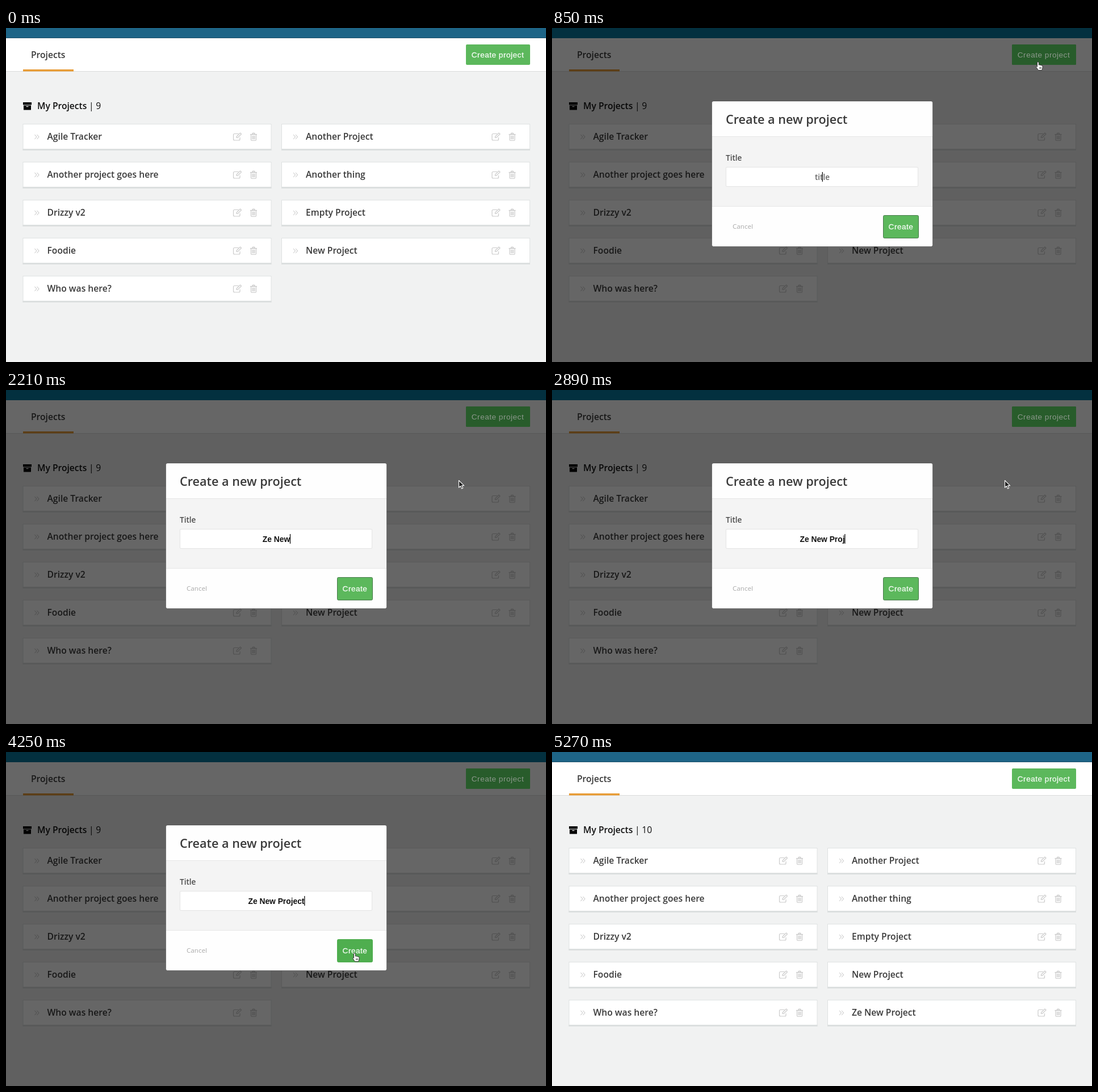
Recreate the animation shown at these times as an HTML page. Size 951 px wide and 589 px high, loop 5.61 s.

```html
<!DOCTYPE html>
<html lang="en">
<head>
<meta charset="utf-8">
<title>Projects</title>
<style>
  html, body { margin: 0; width: 100%; height: 100%; overflow: hidden; background: #f1f2f2; }
  svg { display: block; width: 100%; height: 100%; }
  text { font: 600 15.65px "Open Sans", sans-serif; fill: #3a3a3a; white-space: pre; }
  .plain { font-weight: 400; }
  .small { font-size: 13.6px; }
  .typed { font: 700 13.8px "Liberation Sans", Arial, sans-serif; }
  .btn { font: 400 13.6px "Liberation Sans", Arial, sans-serif; letter-spacing: .5px; }
  .btn { fill: #f4fbf4; stroke: #f4fbf4; stroke-width: .3; text-anchor: middle; }
  .mid { text-anchor: middle; }
</style>
</head>
<body>
<svg viewBox="0 0 951 589">
  <defs>
    <g id="card">
      <rect x=".5" y=".5" width="437" height="46" fill="#fff" stroke="#dfe2e2"/>
      <path d="M0 45.5h438" stroke="#dcdfdf" stroke-width="3"/>
      <path d="M21 19l3.5 4-3.5 4M25 19l3.5 4-3.5 4" fill="none" stroke="#cdcdcd" stroke-width="1.1"/>
      <g fill="none" stroke="#cbcbcb" stroke-width="1.2">
        <path d="M380 17.5h-7a2 2 0 0 0-2 2v7.5a2 2 0 0 0 2 2h7.5a2 2 0 0 0 2-2v-3"/>
        <path d="M376.5 22.5l6.5-6.5 2 2-6.5 6.5h-2z"/>
        <path d="M400.5 18.8h12M404 18.5l1-2h3l1 2" stroke-width="1.4"/>
        <path d="M402 19.5v8.5q0 1.5 1.5 1.5h6q1.5 0 1.5-1.5v-8.5M404.5 21v6.5M406.5 21v6.5M408.5 21v6.5"/>
      </g>
    </g>
  </defs>

  <rect width="951" height="589" fill="#f1f2f2"/>
  <rect width="951" height="18" fill="#1e6587"/>
  <path d="M0 17.5h951" stroke="#1b4f69"/>
  <rect y="18" width="951" height="58" fill="#fff"/>
  <path d="M0 76.5h951" stroke="#dadcdc"/>
  <text x="44" y="53">Projects</text>
  <rect x="30" y="73" width="89" height="3.5" fill="#e89c36"/>
  <rect x="810" y="29" width="113" height="36" rx="2" fill="#5cb85c"/>
  <text class="btn" x="866" y="52">Create project</text>

  <path d="M30 131h15v4.5h-15zM31 136.500h13v8h-13z"/>
  <path d="M35.5 138.5h4" stroke="#f1f2f2" stroke-width="1.3"/>
  <text x="55" y="143" style="fill:#111">My Projects</text>
  <text class="plain" x="146" y="143" style="fill:#111">|<tspan id="count" x="158.3"></tspan></text>
  <g id="cards"></g>

  <g id="dialog">
    <rect width="951" height="589" opacity=".6"/>
    <rect width="951" height="18" fill="#03303f"/>
    <rect x="810" y="29" width="113" height="36" rx="2" fill="#285c2b"/>
    <text class="btn" x="866" y="52" style="fill:#8c988c;stroke:none">Create project</text>

    <rect x="281.5" y="129" width="389" height="256.5" rx="3" fill="#fefefe" stroke="#000" stroke-opacity=".35"/>
    <rect x="282" y="191" width="388" height="124" fill="#f4f4f4"/>
    <path d="M282 191.5h388M282 314.5h388" stroke="#e6e6e6"/>
    <text x="306" y="168.5" style="font-size:21.6px">Create a new project</text>
    <text class="small" x="306" y="233.5" style="fill:#4c4c4c">Title</text>
    <rect x="306.5" y="245.5" width="338" height="34" rx="1.5" fill="#fff" stroke="#e4e4e4"/>
    <text id="hint" class="small mid" x="476" y="267.5" style="fill:#666">title</text>
    <text id="typed" class="typed mid" x="476" y="268" style="fill:#111"></text>
    <rect id="caret" y="254" width="1.3" height="17" fill="#111"/>
    <text class="plain" x="318" y="354" style="font-size:11.65px;fill:#aaa">Cancel</text>
    <rect id="create" x="583.5" y="330.5" width="62" height="40" rx="2"/>
    <text class="btn" x="614.5" y="355">Create</text>
  </g>

  <g id="cursor" stroke-linejoin="round">
    <path id="arrow" d="M0 0v12.5l3-2.7 2 4.6 2.2-1-2-4.3h4z" fill="#222" stroke="#fff" stroke-width="1.1"/>
    <path id="hand" d="M-1.5 1.2q0-1.5 1.4-1.5t1.4 1.5v4q1.5-1 2.4.3 1.5-.8 2.3.5 2-.4 2 1.5v2.5l-1.2 4.5h-6.3l-3.6-5.2q-.9-1.5.4-1.8l1.2.9zM3 9v3M5 9v3" fill="#fff" stroke="#333"/>
  </g>
</svg>
<script>
const $ = id => document.getElementById(id);
const show = (el, on) => el.style.display = on ? "" : "none";

const STEP = 170, LOOP = 5610;
const OPEN = 680, TYPE = 1700, SAVE = 4420;
const title = "Ze New Project";
const typedCounts = [1, 2, 4, 6, 7, 8, 9, 11, 12, 13, 14];
const projects = ["Agile Tracker", "Another Project", "Another project goes here", "Another thing",
  "Drizzy v2", "Empty Project", "Foodie", "New Project", "Who was here?", title];

// Pointer tip: time, x, y
const path = [
  [170, 925, 250], [510, 856, 60], [850, 856, 60], [1360, 797.5, 159.5],
  [3230, 797.5, 159.5], [3740, 614, 355], [4760, 614, 355], [5270, 790, 600]
];

$("cards").innerHTML = projects.map((name, i) => {
  const x = 29.5 + i % 2 * 455.5, y = 169 + (i >> 1) * 67;
  return `<g><use href="#card" x="${x}" y="${y}"/><text x="${x + 43}" y="${y + 28}">${name}</text></g>`;
}).join("");

function pointerAt(t) {
  const i = path.findIndex(p => p[0] > t);
  if (i < 1) return null;
  const [t0, x0, y0] = path[i - 1], [t1, x1, y1] = path[i];
  const k = (t - t0) / (t1 - t0);
  return [x0 + (x1 - x0) * k, y0 + (y1 - y0) * k];
}

function draw(t) {
  const saved = t >= SAVE;
  $("count").textContent = saved ? 10 : 9;
  show($("cards").lastChild, saved);

  show($("dialog"), t >= OPEN && !saved);
  $("dialog").style.opacity = t < OPEN + STEP ? 0.5 : 1;

  const n = Math.round((t - TYPE) / STEP);
  const value = n < 0 ? "" : title.slice(0, typedCounts[Math.min(n, typedCounts.length - 1)]);
  $("typed").textContent = value;
  show($("hint"), !value);
  const width = value && !saved ? $("typed").getComputedTextLength() : 0;
  $("caret").setAttribute("x", 475.7 + width / 2);

  const tip = pointerAt(t);
  show($("cursor"), tip);
  const [x, y] = tip || [0, 0];
  $("cursor").setAttribute("transform", `translate(${x} ${y})`);
  const onNew = x > 810 && x < 923 && y > 29 && y < 65;
  const onCreate = x > 583 && x < 646 && y > 330 && y < 371;
  const hand = onNew || onCreate;
  show($("hand"), hand);
  show($("arrow"), !hand);
  $("create").setAttribute("fill", onCreate ? "#4fae4f" : "#5cb85c");
  $("create").setAttribute("stroke", onCreate ? "#4fae4f" : "#47794a");
}

const start = performance.now();
function frame() {
  const t = (performance.now() - start) % LOOP;
  draw(Math.floor(t / STEP) * STEP);
  requestAnimationFrame(frame);
}
frame();
</script>
</body>
</html>
```
